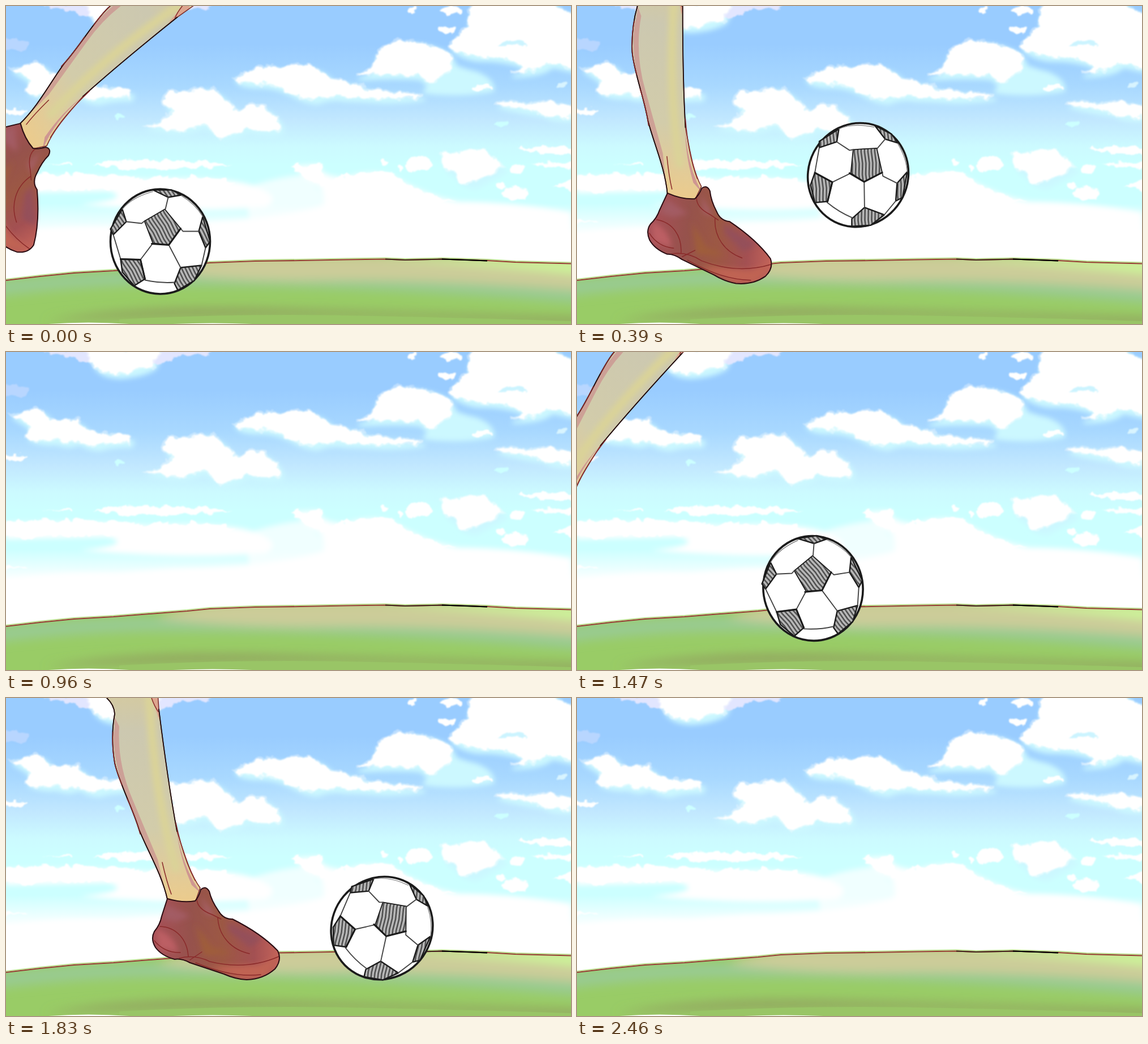
These frames come from a looping animation (998 px wide and 561 px high, 2970 ms). An HTML page:

```html
<!DOCTYPE html>
<html lang="en">
<head>
<meta charset="utf-8">
<style>
  html, body { margin: 0; width: 100%; height: 100%; overflow: hidden; background: #fff; }
  svg { position: absolute; left: 0; top: 0; width: 998px; height: 561px; overflow: hidden; }
  #scene { will-change: transform; }
  #actors { will-change: transform; stroke-linecap: round; stroke-linejoin: round; }
  .line { fill: none; stroke: #8a2a2a; stroke-width: 1.5; }
</style>
</head>
<body>
<svg id="scene" viewBox="0 0 998 561">
  <defs>
    <linearGradient id="sky" x2="0" y2="1">
      <stop offset=".12" stop-color="#99ccff"/>
      <stop offset=".25" stop-color="#a8d8ff"/>
      <stop offset=".36" stop-color="#c2e8ff"/>
      <stop offset=".44" stop-color="#ccfaff"/>
      <stop offset=".5" stop-color="#ccffff"/>
      <stop offset=".62" stop-color="#ccffff"/>
      <stop offset=".72" stop-color="#fff"/>
    </linearGradient>
    <filter id="rough" x="-10" y="-10" width="1018" height="581" filterUnits="userSpaceOnUse" color-interpolation-filters="sRGB">
      <feTurbulence type="fractalNoise" baseFrequency=".05" numOctaves="3" seed="4"/>
      <feDisplacementMap in="SourceGraphic" scale="18" xChannelSelector="R" yChannelSelector="G"/>
      <feGaussianBlur stdDeviation="1.1"/>
    </filter>
    <filter id="soft" x="-60" y="-60" width="1120" height="700" filterUnits="userSpaceOnUse"><feGaussianBlur stdDeviation="5"/></filter>
    <filter id="softer" x="-60" y="-60" width="1120" height="700" filterUnits="userSpaceOnUse"><feGaussianBlur stdDeviation="9"/></filter>
    <path id="hill" d="M0 484L60 477 120 471 190 467 240 463 320 457 360 453 440 450 520 449 600 447.5 670 446.500 705 448 770 446.500 850 449 900 452 998 454.500"/>
    <clipPath id="ground"><path d="M0 484L120 471 190 467 320 457 360 453 440 450 600 447.500 770 446.500 850 449 998 454.500V561H0Z"/></clipPath>
    <g id="clouds">
      <path d="M150 10Q155 36 195 38 235 36 258 22L270-4H140Z"/>
      <path d="M10 110L40 105Q65 96 75 118 85 125 100 120 125 115 140 135 160 148 180 143 205 148 220 152L216 160Q190 158 160 166 140 165 125 155 105 164 85 155 60 158 37 148 45 132 30 122Z"/>
      <path d="M250 211Q290 197 292 185 272 165 285 153 330 152 350 144 375 147 395 175 410 190 425 181 445 167 463 185 488 200 482 219 450 223 425 215 405 225 380 235 365 215 345 208 320 220 290 218Z"/>
      <path d="M402 125Q430 117 455 106 500 112 520 104 555 107 575 130 620 135 640 148 690 152 735 158 700 163 660 163 620 160 595 160 570 155 545 165 520 163 500 150 470 135 440 136 410 136 402 125Z"/>
      <path d="M618 122Q655 115 652 86 680 58 715 62 770 66 787 92 790 115 765 124 752 146 728 122 690 118 618 122Z"/>
      <path d="M828-8Q812 15 816 35 790 55 784 70 800 86 830 89 870 88 900 98 930 110 890 117 945 116 960 100L1005 110V12Q960 5 970-8Z"/>
      <path d="M868 172Q880 163 910 171 960 168 1005 177V196Q960 198 945 187 900 181 868 172Z"/>
      <path d="M770 262Q785 253 800 261 830 250 843 254 858 270 878 285 850 300 828 313 802 315 792 295 770 288 770 262Z"/>
    </g>
  </defs>
  <rect width="998" height="561" fill="url(#sky)"/>

  <g filter="url(#soft)" fill="#fff">
    <path d="M510 282L555 280Q550 300 600 303 640 288 680 298 740 335 800 345 900 346 998 364V490H0V428Q100 395 300 382 470 380 560 352 570 320 530 305Z"/>
    <path d="M0 302Q150 298 250 306 380 300 435 316 490 335 460 355 320 366 130 350 230 340 180 326 80 328 0 330Z"/>
    <path d="M0 404Q90 385 230 392L210 412 0 418Z"/>
    <path d="M420 322Q480 300 530 298L590 360 430 375Z" opacity=".7"/>
  </g>
  <g filter="url(#soft)" fill="#ccf8ff" stroke="#ccf8ff" stroke-width="5">
    <use href="#clouds" x="5" y="7"/>
    <path d="M770 95Q800 112 830 118 862 130 860 149 800 160 740 152Z"/>
  </g>
  <g filter="url(#rough)" fill="#fff">
    <path d="M60-4Q110 14 150 17L255 22Q300 15 320 8L385-4Z" fill="#e2e6ff"/>
    <use href="#clouds" stroke="#fff" stroke-opacity=".35" stroke-width="6"/>
    <path d="M868 66Q895 57 920 68 900 77 868 66Z" fill="#ccf4ff"/>
    <ellipse cx="732" cy="279" rx="23" ry="14"/>
    <ellipse cx="670" cy="277" rx="7" ry="5"/>
    <ellipse cx="698" cy="287" rx="6" ry="5"/>
    <ellipse cx="904" cy="287" rx="14" ry="8"/>
    <ellipse cx="900" cy="330" rx="23" ry="13"/>
    <ellipse cx="874" cy="315" rx="9" ry="8"/>
    <ellipse cx="787" cy="9" rx="20" ry="8"/>
    <ellipse cx="778" cy="43" rx="13" ry="7"/>
    <ellipse cx="719" cy="6" rx="7" ry="4"/>
    <ellipse cx="842" cy="145" rx="18" ry="6"/>
    <ellipse cx="981" cy="140" rx="7" ry="4" fill="#d8f4ff"/>
    <ellipse cx="200" cy="194" rx="7" ry="5" fill="#ccffff"/>
    <ellipse cx="875" cy="209" rx="12" ry="5" fill="#ccffff"/>
    <ellipse cx="10" cy="185" rx="28" ry="5"/>
    <ellipse cx="10" cy="68" rx="32" ry="10" fill="#b8d6ff"/>
    <path d="M148 279Q220 271 290 273 360 271 400 281 330 286 275 291 200 285 148 279Z"/>
    <path d="M900 251Q950 243 1005 251V263Q960 264 900 251ZM925 279L1005 275V287ZM965 316L1005 305V327Z"/>
    <path d="M0 299Q120 294 240 302 340 299 405 309L380 328Q220 318 0 329ZM0 377L40 379 0 384ZM65 278L115 277 115 281Z"/>
    <path d="M506 282L560 278Q548 295 572 306 635 286 680 295 722 330 800 346L650 350Q540 320 506 282Z"/>
  </g>

  <g clip-path="url(#ground)">
    <rect y="430" width="998" height="131" fill="#99cc66"/>
    <g filter="url(#softer)">
      <path d="M-30 500Q150 478 300 480 650 480 1030 513" fill="none" stroke="#99cb92" stroke-width="27"/>
      <path d="M265 468Q330 445 420 440H1030V503Q800 484 600 484 400 488 265 468Z" fill="#cccc99"/>
      <path d="M650 445L1030 450V475Q850 456 650 445Z" fill="#ccf599"/>
      <path d="M70 556Q220 526 480 534 780 542 1030 550V565Q600 536 70 556Z" fill="#92a45f"/>
    </g>
    <path d="M200 553Q420 541 650 547 850 551 998 556V561H200Z" fill="#99c566"/>
    <path d="M75 561Q145 556 218 561ZM295 561Q365 558 435 561Z" fill="#fff"/>
  </g>
  <use href="#hill" y="-2" fill="none" stroke="#b9dd8c" stroke-width="2"/>
  <use href="#hill" fill="none" stroke="#963c32" stroke-width="2"/>
  <path d="M670 446.500L705 448 770 446.500 850 449.500" fill="none" stroke="#42221c" stroke-width="2"/>
  <path d="M770 446.500L815 448 850 449.500" fill="none" stroke="#000" stroke-width="2.200"/>
</svg>

<svg id="actors" viewBox="0 0 998 561">
  <defs>
    <linearGradient id="skin" x2="0" y2="1">
      <stop offset=".1" stop-color="#d6ca9c"/>
      <stop offset=".3" stop-color="#ccc8b0"/>
      <stop offset=".7" stop-color="#d2ccaa"/>
      <stop offset="1" stop-color="#eccb8c"/>
    </linearGradient>
    <linearGradient id="leather">
      <stop offset="0" stop-color="#a85058"/>
      <stop offset=".3" stop-color="#96524c"/>
      <stop offset=".55" stop-color="#9c5844"/>
      <stop offset=".8" stop-color="#a35052"/>
      <stop offset="1" stop-color="#c4645a"/>
    </linearGradient>
    <pattern id="hatch" width="6" height="40" patternUnits="userSpaceOnUse" patternTransform="rotate(-30)">
      <rect width="6" height="40" fill="#bbb"/>
      <path d="M1.500 0L3 20 1.500 40" fill="none" stroke="#484848" stroke-width="2.500"/>
    </pattern>
    <filter id="blend" x="-.4" y="-.4" width="1.800" height="1.800"><feGaussianBlur stdDeviation="5"/></filter>
    <path id="shin" d="M160-70L178 0Q191 12 192 28C186 60 188 90 192 115 200 150 222 190 235 232 250 270 275 310 285 355Q312 364 335 358L343 335C325 310 315 275 302 235 290 170 280 100 270 20L264-70Z"/>
    <path id="shoe" d="M285 354Q312 362 334 358 340 352 344 338 352 330 359 341 363 358 375 375 384 391 400 390C430 405 460 425 480 446Q488 462 475 478 455 496 425 497 405 496 385 487L325 467Q310 459 298 461 275 455 264 440 255 425 262 412 272 400 275 385Z"/>
    <clipPath id="inShin"><use href="#shin"/></clipPath>
    <clipPath id="inShoe"><use href="#shoe"/></clipPath>
  </defs>

  <g id="leg">
    <use href="#shin" fill="url(#skin)"/>
    <g clip-path="url(#inShin)">
      <path d="M250-70C255 80 268 190 300 300" fill="none" stroke="#dad398" stroke-width="15" filter="url(#blend)"/>
      <path d="M175 0Q196 12 191 60C186 110 215 190 235 240L284 352 268 285 224 180Q196 115 200 50Z" fill="#cc9692" opacity=".8"/>
      <path d="M302 235Q312 300 345 345L328 330Q306 280 302 235Z" fill="#cf9692"/>
      <path d="M250-20Q262 10 270 38L276 0Z" fill="#dda58e"/>
      <path class="line" d="M254-10Q260 12 269 24M276 290Q284 325 292 346"/>
    </g>
    <use href="#shin" fill="none" stroke="#7d2a28" stroke-width="1.500"/>
    <path d="M178 0Q191 12 192 28C186 60 188 90 192 115 200 150 222 190 235 232 250 270 275 310 285 355M270 20C280 100 290 170 302 235" fill="none" stroke="#1c0c0c" stroke-width="1.800"/>
    <path class="line" d="M189 60Q185 110 205 153M214 178Q228 207 237 240M300 220Q313 282 334 322"/>

    <use href="#shoe" fill="url(#leather)"/>
    <g clip-path="url(#inShoe)">
      <g filter="url(#blend)">
        <path d="M285 365L325 385 300 395 275 390Z" fill="#a35c64"/>
        <path d="M264 408Q295 415 304 448L270 442Z" fill="#bc5f64"/>
        <path d="M345 350L370 385 352 380Z" fill="#a65e66"/>
        <path d="M390 395L452 425 430 440 395 412Z" fill="#94505a"/>
        <path d="M335 400L365 440 402 450 350 455Z" fill="#9f5d3a"/>
        <path d="M360 475L450 470 482 455 460 492 420 497Z" fill="#c06452"/>
      </g>
      <path class="line" d="M272 403C300 404 320 425 322 456M337 352Q336 372 364 382L380 390M374 388C376 420 398 444 430 451M262 428Q280 450 308 449M325 462L346 448M306 459Q334 452 360 465 425 481 482 456M335 467Q400 494 450 488"/>
    </g>
    <use href="#shoe" fill="none" stroke="#2a0c12" stroke-width="2"/>
  </g>

  <g id="ball" fill="none" stroke="#1b1b1b">
    <ellipse rx="88" ry="92.500" fill="#fff" stroke-width="3.600"/>
    <g fill="url(#hatch)" stroke-width="2.400">
      <path d="M-28-36L8-57 36-23 15 6-13 3Z" stroke-width="1.800"/>
      <path d="M-13-91L14-78 37-82 20-91Z"/>
      <path d="M-67-57L-60-35-83-12-88-22Z"/>
      <path d="M75-44L68-18 80 11 88 0Z"/>
      <path d="M-70 31L-35 32-27 66-46 78-67 54Z"/>
      <path d="M36 46L73 42 60 69 31 86 25 74Z"/>
    </g>
    <path d="M9-57L14-78M-28-36L-33-32-60-35M36-23L40-18 68-18M15 6L36 46M-13 3L-35 32M-83-12L-70 31M80 11L73 42M-27 68Q0 74 25 72" stroke="#444" stroke-width="1.900"/>
    <path d="M-67-57Q-50-78-13-88M37-81Q62-66 75-44" stroke="#777" stroke-width="1.200"/>
    <path d="M-15 4L15 6 36-23M-70 31L-35 32-27 66" stroke-width="3"/>
  </g>
</svg>

<script>
const LOOP = 2970, STEP = 30;

// Rows: time, x, y, angle
const shots = [
  {
    start: 0, end: 960,
    leg: [[0, 296, -29, 58.5], [210, 207, -31, 27], [280, 181, -17, 18],
          [430, 138, -38, 4], [570, 154.5, -82, -4.5], [720, 172, -98, -4.8]],
    ball: [[0, 272.5, 415.5, 0], [150, 272.5, 415.5, 0], [235, 273.5, 411, 0],
           [810, 1101, -8, 99.6]]
  },
  {
    start: 1470, end: 2460,
    leg: [[1470, 172, -45, 50], [1590, 186, 18, 24], [1663, 203, 16, 10],
          [1830, 225, 0, 0], [1950, 223, 2, 0]],
    ball: [[1470, 417, 417, -9], [1663, 417, 417, -9], [1830, 664, 406, 40],
           [1980, 886, 409, 84], [2130, 1108, 416, 128]]
  }
];

function pose(keys, t, smooth) {
  const last = keys.length - 1;
  if (t >= keys[last][0]) return keys[last].slice(1);
  const i = keys.findIndex(k => k[0] > t) - 1;
  const a = keys[i], b = keys[i + 1], span = b[0] - a[0], u = (t - a[0]) / span;
  const time = n => keys[n + 1][0] - keys[n][0];
  const speed = (n, c) => (keys[n + 1][c] - keys[n][c]) / time(n);
  // Tangent of the parabola through three neighbouring keys; at rest at the end
  const slope = (n, c) => {
    if (n === last) return 0;
    if (n === 0) return speed(0, c) * span;
    const before = time(n - 1), after = time(n);
    return (speed(n - 1, c) * after + speed(n, c) * before) / (before + after) * span;
  };
  return [1, 2, 3].map(c => {
    const d = b[c] - a[c];
    if (!smooth) return a[c] + d * u;
    const m = slope(i, c), n = slope(i + 1, c);
    return a[c] + u * (m + u * (3 * d - 2 * m - n + u * (m + n - 2 * d)));
  });
}

function place(el, visible, [x, y, angle], pivot = 0) {
  el.style.display = visible ? '' : 'none';
  el.setAttribute('transform', `translate(${x} ${y}) rotate(${angle}) translate(${-pivot} 0)`);
}

const leg = document.getElementById('leg'), ball = document.getElementById('ball');
const began = performance.now();

function draw(now) {
  const t = Math.floor(Math.max(0, now - began) % LOOP / STEP) * STEP;
  const shot = shots[t < shots[1].start ? 0 : 1];
  place(leg, t < shot.end, pose(shot.leg, t, true), 225);
  place(ball, t < shot.ball.at(-1)[0], pose(shot.ball, t));
  requestAnimationFrame(draw);
}
draw(began);
</script>
</body>
</html>
```
